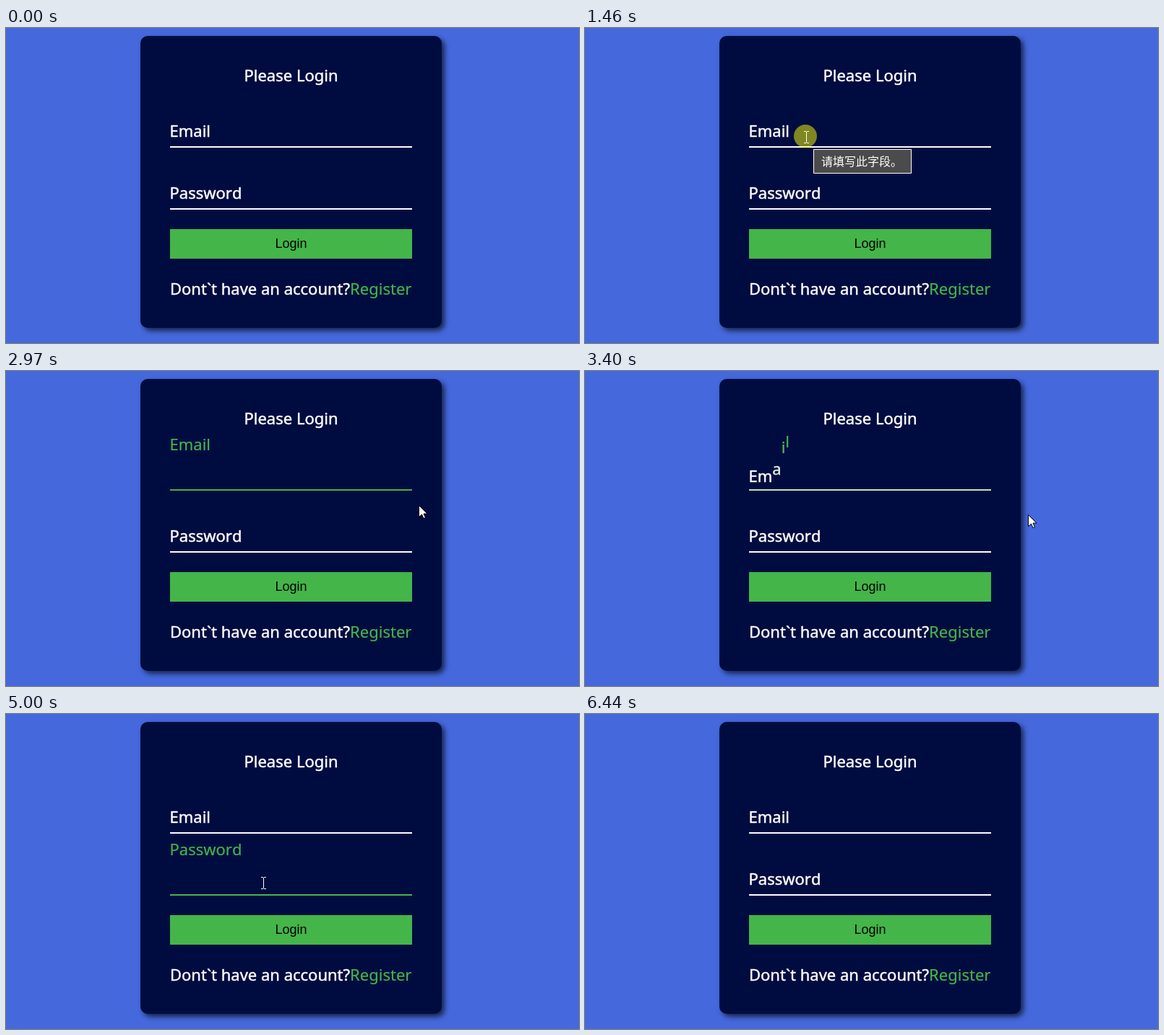
An HTML page with a canvas that plays this animation: 793 by 437 pixels, repeating every 7.38 s.

```html
<!DOCTYPE html>
<html lang="zh-CN">
<head>
<meta charset="utf-8">
<title>Login form</title>
<style>
html, body { margin: 0; width: 100%; height: 100%; overflow: hidden; background: #4568dc; }
canvas { display: block; }
</style>
</head>
<body>
<canvas id="stage" width="793" height="437"></canvas>
<script>
const ctx = document.getElementById('stage').getContext('2d');
const LOOP = 7380;
const BLUE = '#4568dc', NAVY = '#000c40', GREEN = [68, 181, 73], WHITE = [255, 255, 255];
const SANS = '"Noto Sans", "Open Sans", sans-serif';
const LEFT = 227, WIDTH = 335, CENTER = LEFT + WIDTH / 2, LIFT = 41;

const fields = [
  { label: 'Email', baseline: 151, focus: 1510, blur: 3135 },
  { label: 'Password', baseline: 237, focus: 4350, blur: 5480 }
];

// places where the pointer rests
const stops = [
  { arrive: 410, leave: 410, x: 617, y: 399 },
  { arrive: 1250, leave: 2410, x: 306, y: 151 },
  { arrive: 3140, leave: 3480, x: 613, y: 199 },
  { arrive: 4140, leave: 4180, x: 322, y: 232 },
  { arrive: 4290, leave: 5010, x: 356, y: 234 },
  { arrive: 5330, leave: 5700, x: 650, y: 210 },
  { arrive: 6160, leave: 6290, x: 633, y: 364 },
  { arrive: 6440, leave: 6440, x: 708, y: 440 }
];

const clamp = v => Math.min(1, Math.max(0, v));
const smooth = k => k * k * (3 - 2 * k);

function bezier(x1, y1, x2, y2) {
  const at = (a, b, s) => 3 * (1 - s) ** 2 * s * a + 3 * (1 - s) * s * s * b + s ** 3;
  return x => {
    if (x <= 0) return 0;
    if (x >= 1) return 1;
    let lo = 0, hi = 1;
    for (let i = 0; i < 24; i++) {
      const mid = (lo + hi) / 2;
      if (at(x1, x2, mid) < x) lo = mid; else hi = mid;
    }
    return at(y1, y2, lo);
  };
}
const wave = bezier(0.68, -0.55, 0.265, 1.55);
const ease = bezier(0.25, 0.1, 0.25, 1);

function focusLevel(field, t, delay, duration, curve) {
  const level = start => curve((t - start - delay) / duration);
  return level(field.focus) - level(field.blur);
}

function tint(amount) {
  const k = clamp(amount);
  return `rgb(${WHITE.map((w, i) => Math.round(w + (GREEN[i] - w) * k))})`;
}

// Draws text and returns its width; weight thickens the strokes.
function text(str, x, y, { size = 22, color = '#fff', family = SANS, align = 'left', weight = 0.45 } = {}) {
  ctx.font = `${size}px ${family}`;
  ctx.textAlign = align;
  ctx.fillStyle = ctx.strokeStyle = color;
  ctx.fillText(str, x, y);
  if (weight) {
    ctx.lineWidth = weight;
    ctx.lineJoin = 'round';
    ctx.strokeText(str, x, y);
  }
  return ctx.measureText(str).width;
}

function drawCard() {
  ctx.fillStyle = BLUE;
  ctx.fillRect(0, 0, 793, 437);
  ctx.save();
  ctx.shadowColor = 'rgba(0,0,0,0.65)';
  ctx.shadowOffsetX = ctx.shadowOffsetY = 4;
  ctx.shadowBlur = 7;
  ctx.fillStyle = NAVY;
  ctx.beginPath();
  ctx.roundRect(186, 11, 417, 405, 10);
  ctx.fill();
  ctx.restore();

  text('Please Login', CENTER, 74, { align: 'center' });
  ctx.fillStyle = tint(1);
  ctx.fillRect(LEFT, 279, WIDTH, 41);
  text('Login', CENTER, 305, {
    size: 18, color: '#000', family: '"Liberation Sans", Arial, sans-serif', align: 'center', weight: 0
  });
  const width = text('Dont`t have an account?', LEFT, 370);
  text('Register', LEFT + width, 370, { color: tint(1), weight: 0.2 });
}

function drawField(field, t) {
  ctx.fillStyle = tint(focusLevel(field, t, 0, 700, ease));
  ctx.fillRect(LEFT, field.baseline + 13, WIDTH, 2);
  let x = LEFT - 0.5;
  [...field.label].forEach((letter, i) => {
    const level = focusLevel(field, t, i * 50, 300, wave);
    x += text(letter, x, field.baseline - LIFT * level, {
      color: tint(level), weight: 0.45 - 0.25 * clamp(level)
    });
  });
}

function drawTooltip(t) {
  if (t < 1300 || t >= 1560) return;
  ctx.save();
  ctx.globalAlpha = clamp((t - 1300) / 120) * clamp((1560 - t) / 60);
  ctx.fillStyle = '#4b4b4b';
  ctx.fillRect(316, 168, 136, 34);
  ctx.strokeStyle = '#fff';
  ctx.lineWidth = 1;
  ctx.strokeRect(316.5, 168.5, 135, 33);
  text('请填写此字段。', 327, 191, {
    size: 16, family: '"Noto Sans CJK SC", "Noto Sans CJK", sans-serif', weight: 0
  });
  ctx.restore();
}

// Leftward moves sag and rightward moves rise, like a wrist turning.
function pointerAt(t) {
  const next = stops.findIndex(s => t < s.leave);
  if (next < 1) return null;
  const a = stops[next - 1], b = stops[next];
  const k = clamp((t - a.leave) / (b.arrive - a.leave));
  const dx = b.x - a.x, bow = 0.05 * dx * Math.sin(Math.PI * smooth(k));
  return {
    x: Math.round(a.x + dx * smooth(k)),
    y: Math.round(a.y + (b.y - a.y) * smooth(k) - bow)
  };
}

function overInput({ x, y }, t) {
  ctx.font = `22px ${SANS}`;
  return fields.some(f => {
    const raised = focusLevel(f, t, 0, 300, wave) > 0.5;
    const edge = LEFT + (raised ? 0 : ctx.measureText(f.label).width);
    return x > edge && x < LEFT + WIDTH && y > f.baseline - 18 && y < f.baseline + 15;
  });
}

function drawBeam({ x, y }) {
  ctx.fillStyle = '#fff';
  ctx.fillRect(x, y - 7, 1, 15);
  for (const dy of [-8, 8]) {
    ctx.fillRect(x - 3, y + dy, 3, 1);
    ctx.fillRect(x + 1, y + dy, 3, 1);
  }
}

function drawArrow({ x, y }) {
  const outline = [[0, 0], [0, 16], [4, 12.5], [6.5, 18], [9, 17], [6.5, 11.5], [11.5, 11.5]];
  ctx.beginPath();
  outline.forEach(([dx, dy]) => ctx.lineTo(x + dx + 0.5, y + dy + 0.5));
  ctx.closePath();
  ctx.fillStyle = '#fff';
  ctx.fill();
  ctx.strokeStyle = '#000';
  ctx.lineWidth = 1;
  ctx.stroke();
}

function drawPointer(t) {
  const spot = pointerAt(t);
  if (!spot) return;
  const pressed = fields.some(f => [f.focus, f.blur].some(click => t > click - 60 && t < click + 170));
  if (pressed) {
    ctx.fillStyle = 'rgba(255,255,0,0.5)';
    ctx.beginPath();
    ctx.arc(spot.x - 1, spot.y - 1, 16, 0, Math.PI * 2);
    ctx.fill();
  }
  (overInput(spot, t) ? drawBeam : drawArrow)(spot);
}

function draw(t) {
  drawCard();
  fields.forEach(field => drawField(field, t));
  drawTooltip(t);
  drawPointer(t);
}

const start = performance.now();
function tick() {
  draw((performance.now() - start) % LOOP);
  requestAnimationFrame(tick);
}
tick();
</script>
</body>
</html>
```
